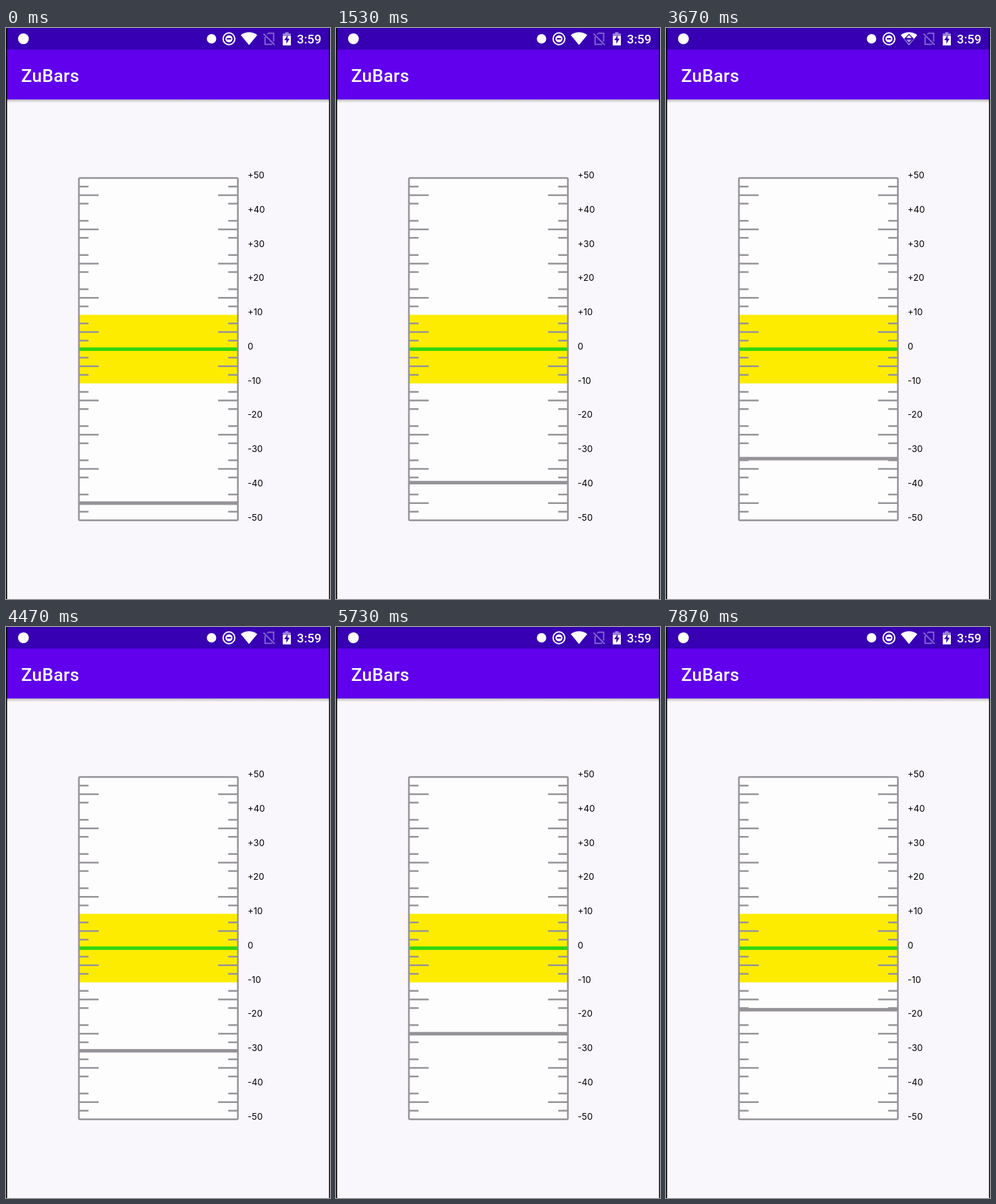
Animation of 480x847 px, one loop 8000 ms. Source, as an HTML page:

```html
<!DOCTYPE html>
<html lang="en">
<head>
<meta charset="utf-8">
<title>Level gauge</title>
<style>
  html, body { margin: 0; width: 100%; height: 100%; overflow: hidden; background: #f9f7fb; }
  svg { display: block; width: 100%; height: 100%; }
  .ui { font: 500 26.4px Roboto, sans-serif; fill: #fff; }
  .label { font: 400 13.2px Inter, sans-serif; fill: #000; }
  .line { stroke: #959398; stroke-width: 2.5; fill: none; }
</style>
</head>
<body>
<svg viewBox="0 0 480 847">
  <defs>
    <linearGradient id="shade" x2="0" y2="1">
      <stop offset="0" stop-color="#000" stop-opacity=".25"/>
      <stop offset="1" stop-color="#000" stop-opacity="0"/>
    </linearGradient>
  </defs>
  <rect width="480" height="847" fill="#f9f7fb"/>
  <rect y="106" width="480" height="5" fill="url(#shade)"/>
  <rect y="31" width="480" height="75" fill="#6000ec"/>
  <rect width="480" height="32" fill="#3700b3"/>

  <!-- status icons -->
  <g fill="#fff">
    <circle cx="25.8" cy="16" r="8"/>
    <circle cx="304.5" cy="16" r="7"/>
    <circle cx="330.3" cy="16" r="8.7" fill="none" stroke="#fff" stroke-width="2"/>
    <circle cx="330.3" cy="16" r="5.3"/>
    <rect x="327.2" y="14.9" width="6.2" height="2.2" fill="#3700b3"/>
    <path d="M360 25.2 L347.8 10.4 Q353.5 6.3 360 6.3 T372.2 10.4 Z"/>
    <g id="net">
      <path d="M360 8.6 L367.2 16 L360 24 L352.8 16 Z" fill="#3700b3"/>
      <path id="up" d="M360 10.6 L364 14.8 H356 Z"/>
      <path id="down" d="M360 21.4 L364 17.2 H356 Z"/>
    </g>
    <g fill="none" stroke="#8062cf" stroke-width="2">
      <path d="M387 9.2 L389 7.8 H396.5 V20 M383.8 13 V24.2 H394.5 M381.5 8.5 L398 25"/>
    </g>
    <path d="M413.5 6.3 H418.5 V8.3 H422 V12 H410 V8.3 H413.5 Z" fill="#9b85d9"/>
    <path d="M410 12 H422 V25.8 H410 Z"/>
    <path d="M417.2 10.5 L412.2 18 H415.3 V23.6 L420.2 15.8 H417.2 Z" fill="#3700b3"/>
  </g>
  <text class="ui" x="431" y="22.5" style="font-size:18.4px">3:59</text>
  <text class="ui" x="22.6" y="79.6" letter-spacing=".3">ZuBars</text>

  <!-- gauge -->
  <rect x="108" y="222.5" width="235.5" height="507.7" fill="#fefdfe"/>
  <rect x="108" y="425.5" width="235.5" height="101.7" fill="#fdec00"/>
  <path id="ticks" class="line"/>
  <rect x="108" y="473.8" width="235.5" height="5.2" fill="#31d60e"/>
  <rect class="line" x="108" y="222.5" width="235.5" height="507.7" rx="1.5"/>
  <rect id="bar" x="108" y="-2.6" width="235.5" height="5.2" fill="#959398"/>
  <g id="labels" class="label"></g>

  <path d="M0 0 H1.6 V847 H0 Z M478.6 0 H480 V847 H478.6 Z"/>
</svg>
<script>
  const $ = id => document.getElementById(id);
  const LOOP = 8000, ZERO = 476.35, UNIT = 5.077;
  const yOf = v => ZERO - v * UNIT;

  let d = '';
  for (let i = 1; i < 40; i++) {
    if (i % 4 === 0) continue;
    const y = yOf(50 - i * 2.5), len = i % 4 === 2 ? 29.3 : 14.3;
    d += `M108 ${y}h${len}M343.5 ${y}h${-len}`;
  }
  $('ticks').setAttribute('d', d);

  for (let v = 50; v >= -50; v -= 10) {
    const t = document.createElementNS('http://www.w3.org/2000/svg', 'text');
    t.setAttribute('x', 358);
    t.setAttribute('y', yOf(v) + 0.6);
    t.textContent = (v > 0 ? '+' : '') + v;
    $('labels').append(t);
  }

  // The level climbs one unit at each of these moments.
  const steps = [];
  for (let i = 0; i < 27; i++) steps.push(70 + 600 * (i >> 1) + 260 * (i % 2));
  steps[25] = 7600;

  const show = (id, on) => $(id).setAttribute('opacity', on ? 1 : 0);

  function draw(now) {
    const t = now % LOOP;
    const level = -45 + steps.filter(s => s <= t).length;
    $('bar').setAttribute('transform', `translate(0 ${yOf(level)})`);
    show('net', t >= 2470 && t < 4470);
    $('down').setAttribute('opacity', t < 3470 ? 1 : 0.6);
  }

  let start;
  function tick(now) {
    start ??= now;
    draw(now - start);
    requestAnimationFrame(tick);
  }
  draw(0);
  requestAnimationFrame(tick);
</script>
</body>
</html>
```
